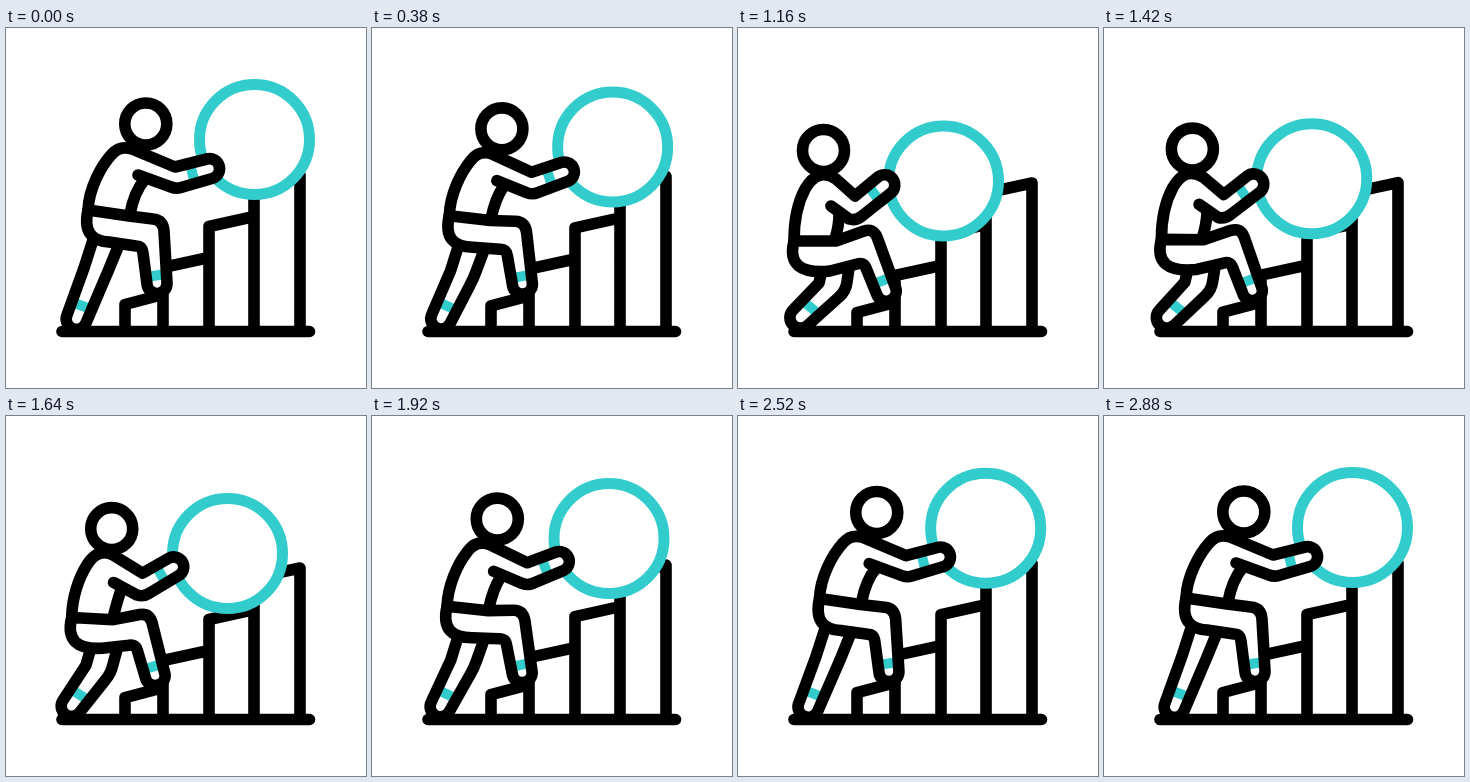
Animation of 360x360 px, one loop 3220 ms. Source, as an HTML page:

```html
<!DOCTYPE html>
<html lang="en">
<head>
<meta charset="utf-8">
<style>
html, body { margin: 0; height: 100%; overflow: hidden; background: #fff; }
svg { display: block; width: 100vw; height: 100vh; }
path, circle { fill: none; stroke: #000; stroke-width: 11.6; stroke-linecap: round; stroke-linejoin: round; }
.solid { fill: #fff; stroke: none; }
.teal { stroke: #33cccc; stroke-width: 10; stroke-linecap: butt; }
.ball { fill: #fff; stroke: #33cccc; stroke-width: 11; }
.head { fill: #fff; }
</style>
</head>
<body>
<svg id="stage" viewBox="0 0 360 360"></svg>
<script>
const LOOP = 3220;
const stage = document.getElementById('stage');
const parts = [];

function add(tag, cls, attrs = {}) {
  const el = document.createElementNS('http://www.w3.org/2000/svg', tag);
  if (cls) el.setAttribute('class', cls);
  for (const k in attrs) el.setAttribute(k, attrs[k]);
  stage.appendChild(el);
  return el;
}

// Blend two paths that share the same command structure.
function blend(a, b, s) {
  const num = /-?\d+(\.\d+)?/g;
  const to = b.match(num);
  let i = 0;
  return a.replace(num, v => +(+v + (to[i++] - v) * s).toFixed(2));
}

function shape(cls, up, down) {
  const el = add('path', cls);
  parts.push(s => el.setAttribute('d', blend(up, down, s)));
}

function disc(cls, r, up, down) {
  const el = add('circle', cls, { r });
  parts.push(s => ['cx', 'cy'].forEach((k, i) =>
    el.setAttribute(k, up[i] + (down[i] - up[i]) * s)));
}

function limb(up, down, cuffUp, cuffDown) {
  shape('solid', up, down);
  shape('teal', cuffUp, cuffDown);
  shape('', up, down);
}

function bars(dy) {
  return [[119, 276.5, 157], [157, 239.5, 203], [203, 198.5, 248], [248, 157, 294]]
    .map(([x, y, x2]) => `M${x} 303L${x} ${y + dy}L${x2} ${y + dy - 10}`)
    .join('') + 'L294 303';
}

shape('', bars(0), bars(8));

// back leg
limb(
  'M87 212L78 240L61 287A10 10 0 0 0 80 295L97 255Q100 248 103 241L112 219',
  'M83 246L81 255L55 282A10 10 0 0 0 70 297L101 269Q108 263 109 254L111 240',
  'M66 274L87 282', 'M65 273L83 288');

add('path', '', { d: 'M56 303.5H303.5' });
disc('ball', 55, [248.5, 111.5], [205.5, 153]);

// torso and arm
limb(
  'M82 182C83 160 95 138 106 126Q114 117 126 121L169 139L201 131A10 10 0 0 1 206 150.5L175 159.5Q170 161 165 159L132 147',
  'M56 213C56 195 59 176 67 161Q80 139 98 151L117 168L140 149A10 10 0 0 1 153 165L124 188Q118 193 111 191L93 178',
  'M184 136L189 156', 'M129 156L143 175');
shape('', 'M139 151Q128 164 124 186', 'M101 187Q101 198 97 211');

// front leg
limb(
  'M82 182L123 188L147 191Q157 192 158 203L161 255A10 10 0 0 1 141 256L137 225Q136 218 130 218L103 214C86 213 77 204 82 182Z',
  'M56 213L98 213L126 203Q135 200 139 209L158 261A10 10 0 0 1 139 267L128 240Q126 234 119 236L92 243C62 246 50 236 56 213Z',
  'M140 249L160 246', 'M133 257L154 249');

disc('head', 21, [139.8, 96], [85.5, 122.5]);

// cubic-bezier(.3, 0, .15, 1)
function ease(x) {
  if (x <= 0) return 0;
  if (x >= 1) return 1;
  let lo = 0, hi = 1, p = 0.5;
  for (let i = 0; i < 24; i++) {
    p = (lo + hi) / 2;
    const q = 1 - p;
    if (0.9 * p * q * q + 0.45 * p * p * q + p * p * p < x) lo = p;
    else hi = p;
  }
  return p * p * (3 - 2 * p);
}

function draw(now) {
  const t = now % LOOP;
  const s = ease((t - 225) / 895) - ease((t - 1260) / 1560);
  parts.forEach(f => f(s));
}

function tick() {
  draw(performance.now());
  requestAnimationFrame(tick);
}
tick();
</script>
</body>
</html>
```
